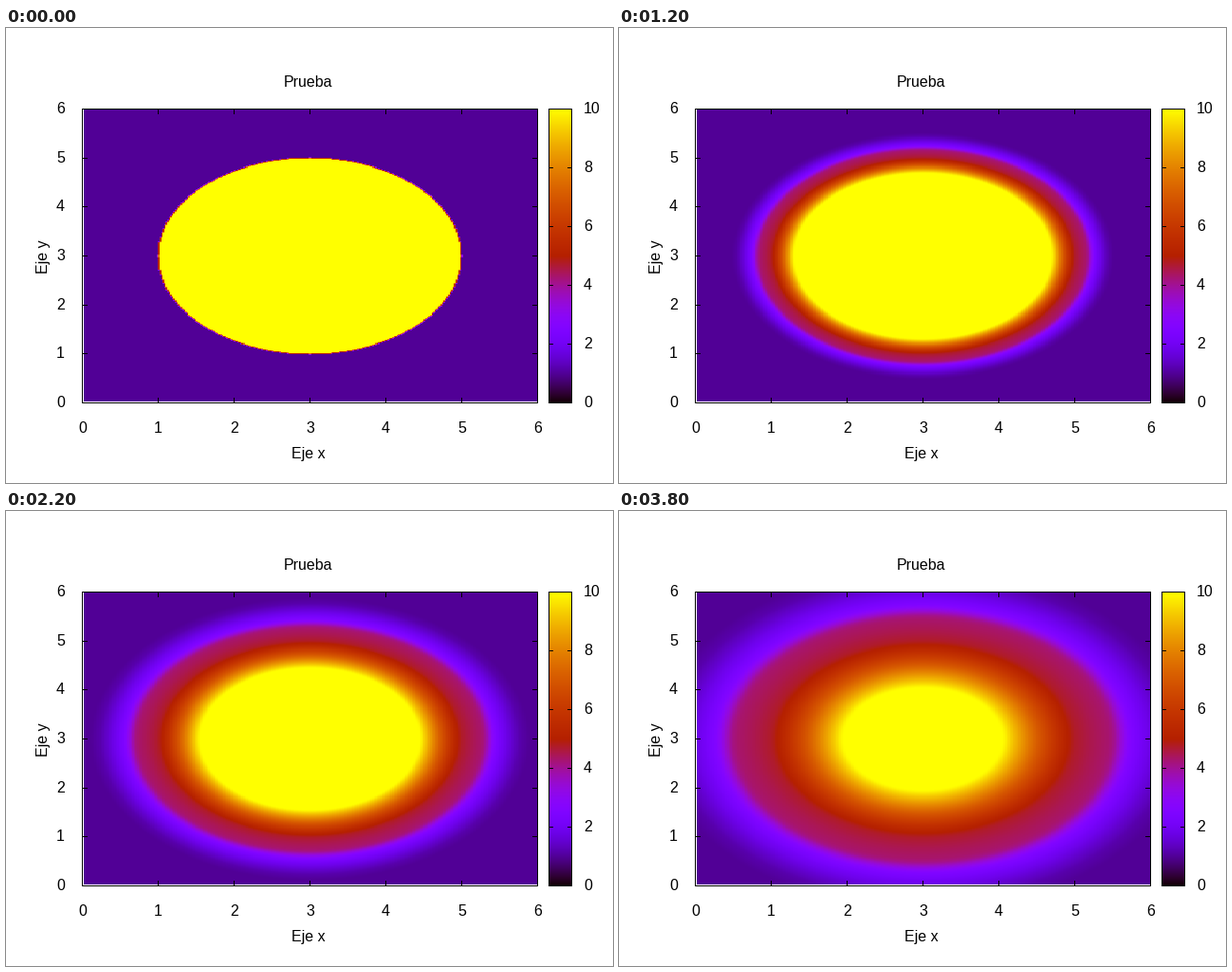
Recreate the animation shown at these times as a matplotlib script. Size 640x480 px, loop 4000 ms.

```python
import numpy as np
import matplotlib.pyplot as plt
from matplotlib.animation import FuncAnimation
from matplotlib.patches import Rectangle

W, H, DPI = 640, 480, 100
FRAMES, INTERVAL = 20, 200
LEFT, RIGHT, TOP, BOTTOM = 80, 560, 85, 395
UX, UY = (RIGHT - LEFT) / 6, (BOTTOM - TOP) / 6
STEP = 0.02  # mesh spacing in axis units

plt.rcParams["font.family"] = "Liberation Sans"
FONT_PT = 16 * 72 / DPI

# Self-similar wave profile: height against front speed in px per frame
SPEED = [-9, -3.95, -3.65, -3, -2, -1, -0.4, 0, 0.9, 1.8,
         2.1, 2.6, 2.95, 3.6, 4.5, 5.2, 6, 9]
LEVEL = [10, 10, 9.5, 8.5, 7, 5.75, 5.05, 4.75, 4.5, 4.3,
         4.1, 3.2, 2.55, 2.05, 1.5, 1.17, 1, 1]
fine = np.linspace(-9, 9, 1801)
kernel = np.hanning(37)
kernel /= kernel.sum()
profile = np.convolve(np.pad(np.interp(fine, SPEED, LEVEL), 18, mode="edge"),
                      kernel, mode="valid")


def palette(v):
    x = np.clip(v / 10, 0, 1)
    rgb = np.stack([np.sqrt(x), x ** 3, np.sin(2 * np.pi * x)], axis=-1)
    return np.uint8(np.clip(rgb, 0, 1) * 255 + 0.5)


nodes = np.arange(1, 301) * STEP
radius = np.hypot(*np.meshgrid(nodes - 3, nodes - 3))

# Mesh cell under every pixel of the map
px = np.arange(LEFT + 2, RIGHT + 1)
py = np.arange(TOP, BOTTOM - 1)
col = np.clip(((px - LEFT) / UX / STEP).astype(int) - 1, 0, 298)
row = np.clip(((BOTTOM - py) / UY / STEP).astype(int) - 1, 0, 298)


def surface(n):
    if n == 0:
        u = np.where(radius <= 2 + 1e-9, 10.0, 1.0)
    else:
        d = (radius - 2) * UX
        u = np.interp(np.where(d > 0, d / (n + 0.8), d / n), fine, profile)
    cells = (u[:-1, :-1] + u[1:, :-1] + u[:-1, 1:] + u[1:, 1:]) / 4
    return palette(cells[np.ix_(row, col)])


fig = plt.figure(figsize=(W / DPI, H / DPI), dpi=DPI, facecolor="white")
ax = fig.add_axes([0, 0, 1, 1])


def picture(data, box):
    return ax.imshow(data, extent=box, aspect="auto", interpolation="nearest")


def bar(x, y, w, h):
    ax.add_patch(Rectangle((x, y), w, h, fc="black", lw=0, aa=False, zorder=3))


def frame(x0, y0, x1, y1):
    bar(x0, y0, x1 - x0 + 1, 1)
    bar(x0, y1, x1 - x0 + 1, 1)
    bar(x0, y0, 1, y1 - y0 + 1)
    bar(x1, y0, 1, y1 - y0 + 1)


def label(x, y, s, ha="center", **kw):
    ax.text(x, y, s, ha=ha, va="baseline", fontsize=FONT_PT, color="black", **kw)


field = picture(surface(0), (LEFT + 2, RIGHT + 1, BOTTOM - 1, TOP))
scale = np.linspace(10, 0, BOTTOM - TOP + 1)[:, None]
picture(palette(scale), (572, 597, BOTTOM + 1, TOP))
ax.set_xlim(0, W)
ax.set_ylim(H, 0)
ax.axis("off")

frame(LEFT, TOP, RIGHT, BOTTOM)
frame(572, TOP, 596, BOTTOM)

for k in range(7):
    x, y = round(LEFT + k * UX), round(BOTTOM - k * UY)
    bar(x, TOP, 1, 6)
    bar(x, BOTTOM - 5, 1, 6)
    bar(LEFT, y, 6, 1)
    bar(RIGHT - 5, y, 6, 1)
    label(x + 0.5, 427, str(k))
    label(62, y + 5, str(k), ha="right")

for v in range(0, 11, 2):
    y = round(BOTTOM - v * (BOTTOM - TOP) / 10)
    bar(572, y, 5, 1)
    bar(592, y, 5, 1)
    label(609, y + 5, str(v), ha="left")

label(318.5, 62, "Prueba")
label(318.5, 454, "Eje x")
ax.text(44, 241, "Eje y", ha="right", va="center", rotation=90,
        rotation_mode="default", fontsize=FONT_PT, color="black").set(
            ha="center", va="baseline", rotation_mode="anchor")


def update(n):
    field.set_data(surface(n))
    return [field]


anim = FuncAnimation(fig, update, frames=FRAMES, interval=INTERVAL,
                     repeat=True, repeat_delay=0, blit=False)
plt.show()
```
